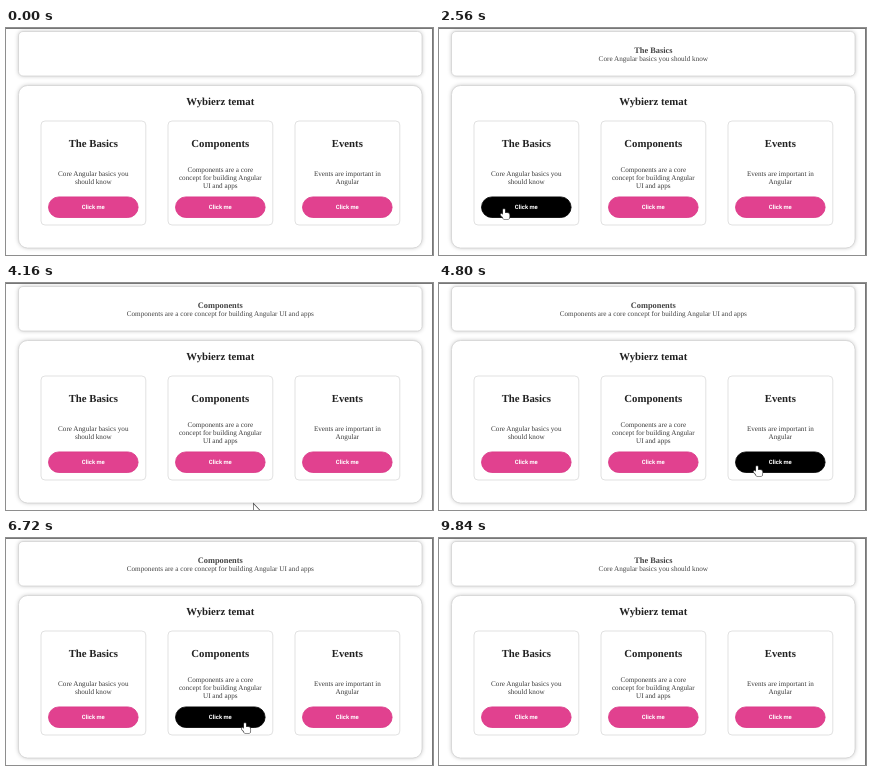
Recreate the animation shown at these times as an HTML page with a canvas. Size 427 by 227 pixels, loop 9.92 s.

```html
<!DOCTYPE html>
<html lang="pl">
<head>
<meta charset="utf-8">
<style>
  html, body { margin: 0; width: 100%; height: 100%; overflow: hidden; background: #fff; }
  canvas { display: block; width: 427px; height: 227px; }
</style>
</head>
<body>
<canvas></canvas>
<script>
const W = 427, H = 227, LOOP = 9920, STEP = 80;
const MIDDLE = 214.3, CARD_GAP = 127;
const SERIF = '"Liberation Serif", serif';
const BUTTON = { w: 89.6, h: 20.6, y: 179.2 };
const CLICK_DELAY = 160;

const canvas = document.querySelector('canvas');
const ctx = canvas.getContext('2d');
const ratio = window.devicePixelRatio || 1;
canvas.width = W * ratio;
canvas.height = H * ratio;

const topics = [
  { title: 'The Basics', lines: ['Core Angular basics you', 'should know'] },
  { title: 'Components', lines: ['Components are a core', 'concept for building Angular', 'UI and apps'] },
  { title: 'Events', lines: ['Events are important in', 'Angular'] }
];
topics.forEach((topic, i) => { topic.x = MIDDLE + (i - 1) * CARD_GAP; });
const [basics, components, events] = topics;

// The pointer rests at each stop, then glides to the next one.
const stops = [
  { arrive: 1280, leave: 1280, x: -9, y: 196 },
  { arrive: 1760, leave: 2640, x: 65, y: 181, topic: basics },
  { arrive: 3360, leave: 3760, x: 206, y: 184, topic: components },
  { arrive: 4320, leave: 4400, x: 258, y: 227 },
  { arrive: 4800, leave: 5200, x: 318, y: 183, topic: events },
  { arrive: 5840, leave: 6720, x: 239, y: 185, topic: components },
  { arrive: 7360, leave: 7920, x: 112, y: 185, topic: basics },
  { arrive: 8240, leave: 8240, x: 124, y: 230 }
];

const smooth = k => k * k * (3 - 2 * k);
const mix = (a, b, k) => a + (b - a) * k;

function pointerAt(t) {
  const i = stops.findIndex(stop => t < stop.arrive);
  if (i < 1) return null;
  const from = stops[i - 1], to = stops[i];
  const k = Math.max(0, (t - from.leave) / (to.arrive - from.leave));
  const sag = 3.5 * Math.sin(Math.PI * k);
  return { x: mix(from.x, to.x, smooth(k)), y: mix(from.y, to.y, smooth(k)) + sag };
}

const selectedAt = t =>
  stops.filter(stop => stop.topic && stop.arrive + CLICK_DELAY <= t).pop()?.topic;

const isOver = (p, topic) =>
  Math.abs(p.x - topic.x) < BUTTON.w / 2 && Math.abs(p.y - BUTTON.y) < BUTTON.h / 2;

function text(str, x, y, font, color) {
  ctx.font = font;
  ctx.fillStyle = color;
  ctx.fillText(str, x, y);
}

function box(x, y, w, h, r, fill, stroke, blur = 0) {
  ctx.save();
  ctx.beginPath();
  ctx.roundRect(x, y, w, h, r);
  ctx.fillStyle = fill;
  ctx.shadowColor = 'rgba(0,0,0,0.25)';
  ctx.shadowBlur = blur * ratio;
  ctx.fill();
  ctx.shadowColor = 'transparent';
  ctx.strokeStyle = stroke;
  ctx.lineWidth = 0.8;
  ctx.stroke();
  ctx.restore();
}

function drawCard({ x, title, lines }, hovered) {
  box(x - 52.3, 93, 104.8, 104, 4, '#fff', '#dadada');
  text(title, x, 118.7, `bold 10.75px ${SERIF}`, '#222');
  lines.forEach((line, i) => {
    const row = i - (lines.length - 1) / 2;
    text(line, x, 151.8 + row * 7.9, `7.15px ${SERIF}`, '#3c3c3c');
  });

  const { w, h, y } = BUTTON;
  box(x - w / 2, y - h / 2, w, h, h / 2,
      hovered ? '#000' : '#e1418f', hovered ? '#000' : '#da3586');
  text('Click me', x, 181.4, 'bold 5.9px Roboto, sans-serif', '#fff');
}

// Outlines the union of all parts, then fills over the inner edges.
function outlined(shape) {
  ctx.fillStyle = '#fff';
  ctx.strokeStyle = '#444';
  ctx.lineWidth = 1.3;
  ctx.stroke(shape);
  ctx.fill(shape);
}

function handShape() {
  const shape = new Path2D();
  shape.roundRect(-1, 0, 2, 8, 1);
  shape.roundRect(-1.2, 4, 6.6, 6.2, 2);
  shape.ellipse(-1.6, 6.6, 2.2, 1, 0.8, 0, Math.PI * 2);
  return shape;
}

function arrowShape() {
  const shape = new Path2D('M0 0V8L5.5 5.7Z');
  shape.addPath(new Path2D('M1.6 6L3 9.2L4.2 8.7L2.9 5.4Z'));
  return shape;
}

function drawPointer(p, hand) {
  ctx.save();
  ctx.translate(p.x, p.y);
  outlined(hand ? handShape() : arrowShape());
  ctx.restore();
}

function draw(t) {
  ctx.setTransform(ratio, 0, 0, ratio, 0, 0);
  ctx.textAlign = 'center';
  ctx.textRendering = 'geometricPrecision';
  ctx.fillStyle = '#fff';
  ctx.fillRect(0, 0, W, H);

  box(12.5, 3.5, 403.5, 44.5, 4.5, '#fff', '#d4d4d4', 4);
  box(12.5, 57.5, 403.5, 162.5, 9, '#fff', '#d4d4d4', 4);

  const selected = selectedAt(t);
  if (selected) {
    text(selected.title, MIDDLE, 24.6, `bold 8.35px ${SERIF}`, '#444');
    text(selected.lines.join(' '), MIDDLE, 33.2, `7.18px ${SERIF}`, '#444');
  }

  text('Wybierz temat', MIDDLE, 76.5, `bold 10.75px ${SERIF}`, '#222');
  const pointer = pointerAt(t);
  const hovered = pointer && topics.find(topic => isOver(pointer, topic));
  topics.forEach(topic => drawCard(topic, topic === hovered));

  ctx.fillStyle = '#777';
  ctx.fillRect(0, 0, W, 1);
  ctx.fillRect(W - 1, 0, 1, H);
  if (pointer) drawPointer(pointer, hovered);
}

const start = performance.now();
function tick() {
  const t = (performance.now() - start) % LOOP;
  draw(Math.floor(t / STEP) * STEP);
  requestAnimationFrame(tick);
}
tick();
</script>
</body>
</html>
```
